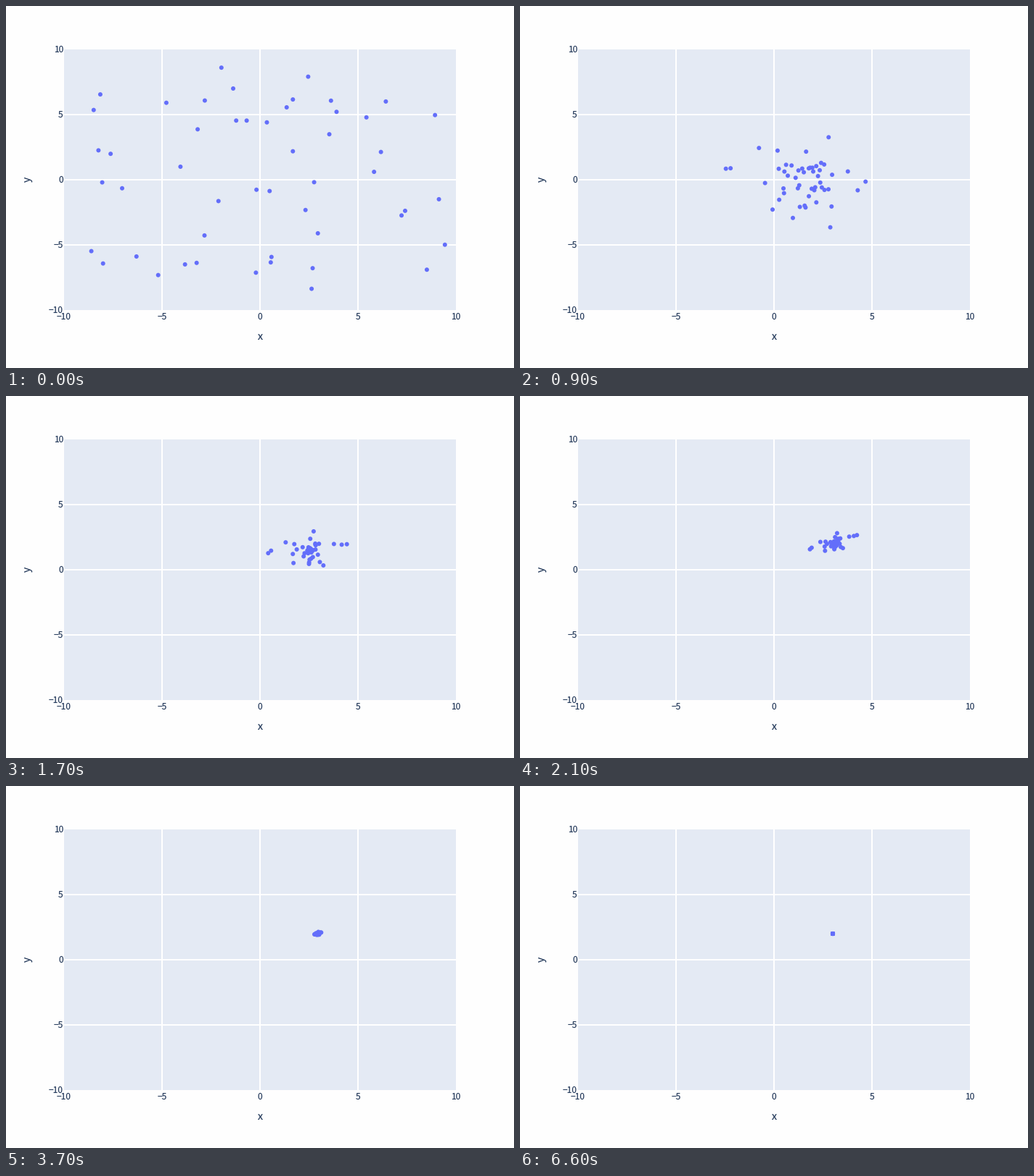
Write a matplotlib script that moves like this. It is 700 px wide and 500 px high and loops after 6.7 s.

```python
import numpy as np
import matplotlib.pyplot as plt
from matplotlib.animation import FuncAnimation

FRAMES, STEP, N = 67, 100, 50
PT = 0.72  # points per pixel at 100 dpi
BLUE, PANEL, PAPER, INK = "#636efa", "#e4eaf4", "#fefefe", "#2a3f5f"
plt.rcParams["font.family"] = "Noto Sans CJK JP"
plt.rcParams["text.hinting"] = "none"

# Swarm path in pixels: frame, centre x and y, half width and height
PATH = np.array([
    (0, 361, 239, 246, 155),
    (5, 384, 256, 130, 92),
    (13, 404, 222, 98, 62),
    (21, 434, 202, 35, 14),
    (28, 433, 203, 22, 9),
    (37, 430, 203.7, 5, 2.5),
    (49, 430.7, 204, 2.5, 1.2),
    (66, 431, 204, 0.1, 0.1),
])

# Even spread at the start, dense core with a few stragglers later on
rng = np.random.default_rng(7)
spread = rng.uniform(-1, 1, (N, 2))
angle = np.arctan2(spread[:, 1], spread[:, 0]) + rng.normal(0, 0.6, N)
radius = rng.permutation(np.linspace(0.02, 1, N)) ** 2.3
core = radius[:, None] * np.column_stack([np.cos(angle), np.sin(angle)])


def swarm(k):
    t, cx, cy, w, h = PATH.T
    centre = np.array([np.interp(k, t, c) for c in (cx, cy)])
    half = np.exp([np.interp(k, t, np.log(s)) for s in (w, h)])
    mix = min(k / 13, 1) ** 0.7
    offset = half * ((1 - mix) * spread + mix * core)
    # The cluster leans along the diagonal as it closes in
    offset[:, 1] -= 0.35 * np.clip((k - 13) / 8, 0, 1) * offset[:, 0]
    return centre + offset


fig = plt.figure(figsize=(7, 5), dpi=100, facecolor=PAPER)
ax = fig.add_axes([0, 0, 1, 1])
ax.set(xlim=(0, 700), ylim=(500, 0))
ax.axis("off")
ax.add_patch(plt.Rectangle((80, 60), 540, 360, fc=PANEL, lw=0))


def label(x, y, text, px=12, **kw):
    ax.text(x, y, text, size=px * PT, color=INK, va="baseline", **kw)


def grid_line(xs, ys):
    ax.plot(xs, ys, color="white", lw=2 * PT, solid_capstyle="butt")


for v in range(-10, 11, 5):
    x, y = 350 + 27 * v, 240 - 18 * v
    if abs(v) < 10:
        grid_line([x, x], [60, 420])
        grid_line([80, 620], [y, y])
    name = str(v).replace("-", "\u2212")
    label(x, 433, name, ha="center")
    label(79, y + 4, name, ha="right")
label(350, 461, "x", 14, ha="center")
label(35, 240, "y", 14, ha="center", rotation=90, rotation_mode="anchor")

# One colour per dot keeps sub-pixel positions
dots = ax.scatter(*swarm(0).T, s=(6 * PT) ** 2, c=[BLUE] * N, linewidths=0, zorder=3)


def draw(k):
    dots.set_offsets(swarm(k))
    return [dots]


anim = FuncAnimation(fig, draw, frames=FRAMES, interval=STEP, repeat=True,
                     repeat_delay=0, blit=False)
plt.show()
```
